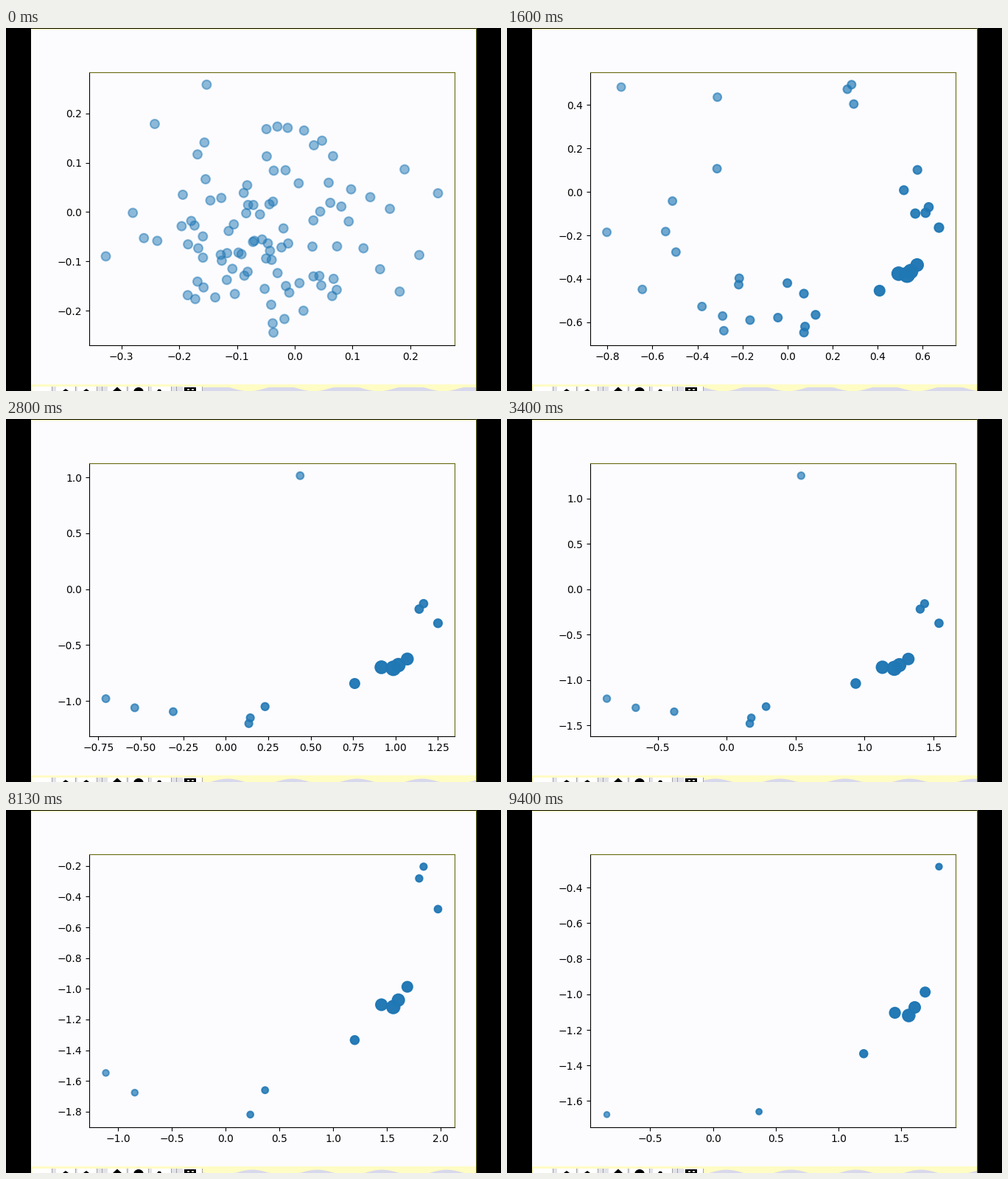
A matplotlib script for the animation above (9870 ms loop, 672x492 px).

```python
import numpy as np
import matplotlib.pyplot as plt
from matplotlib.animation import FuncAnimation
from matplotlib.patches import Circle, Polygon, Rectangle

W, H, DPI = 672, 492, 100
LEFT, RIGHT, TOP, BOTTOM = 113, 609, 60, 429.6
STEP, LOOP = 30, 9870
PAPER, OLIVE, LILAC = "#fcfcff", "#6a6a10", "#d8d8ec"
BLUE = (0x1F / 255, 0x77 / 255, 0xB4 / 255)

# Start time of each pose
STARTS = [0, 1000, 1600, 2200, 2800, 3400, 3930, 8130, 8730, 9400]

# Cluster centres at full growth, by the (first, last) pose they live in
CENTRES = {
    (1, 9): [(1.666, -0.261), (1.564, -0.914), (1.341, -1.022),
             (1.443, -1.036), (1.487, -0.994), (1.111, -1.235),
             (0.339, -1.537), (-0.783, -1.552)],
    (1, 8): [(1.828, -0.446)],
    (1, 7): [(1.704, -0.19), (0.212, -1.684), (-1.032, -1.433)],
    (1, 6): [(0.199, -1.759), (-0.452, -1.603)],
    (1, 3): [(0.722, 1.285), (0.8, 1.1), (-0.846, 1.186), (-2.18, -0.504),
             (-1.388, -0.114), (1.568, 0.276), (0.198, -1.272),
             (-0.589, -1.16), (-0.768, -1.736), (1.542, -0.27)],
    (4, 5): [(0.641, 1.485)],
}
HEART = (1.443, -1.036)

# Loose dots per pose: how many, and the corners of the box they fill
CORNERS = np.array([(-0.568, -0.445), (0.3975, 0.38)])
LOOSE = [
    (98, np.array([(-0.327, -0.244), (0.248, 0.258)])),
    (36, CORNERS),
    (10, 1.3 * CORNERS),
]


def fill(pts, corners):
    """Stretch points so that they span a box."""
    lo, hi = pts.min(0), pts.max(0)
    return corners[0] + (pts - lo) / (hi - lo) * (corners[1] - corners[0])


def pose(k):
    """Positions, radii, opacities and axis limits of pose k."""
    grow = min(1 + 0.158 * (k - 6), 1.08)
    xy = [(grow * x, grow * y) for (first, last), pts in CENTRES.items()
          if first <= k <= last for x, y in pts]
    xy = np.array(xy).reshape(-1, 2)
    if k < len(LOOSE):
        count, corners = LOOSE[k]
        xy = np.vstack([fill(cloud[:count], corners), xy])

    # Dots grow larger and denser towards the heart of the cluster
    dist = np.hypot(*(xy / grow - HEART).T)
    merged = min(k, 1)
    radius = 7 - 0.25 * k + merged * 4.5 * np.exp(-dist / 0.35)
    alpha = 1 - 0.5 ** (1 + merged * 5 * np.exp(-dist / 1.2))

    lo, hi = xy.min(0), xy.max(0)
    pad = 0.05 * (hi - lo)
    return xy, radius, alpha, np.array([lo - pad, hi + pad])


cloud = np.random.default_rng(5).normal(size=(98, 2))
POSES = [pose(k) for k in range(len(STARTS))]

fig = plt.figure(figsize=(W / DPI, H / DPI), dpi=DPI, facecolor="black")

# Window and the top edge of its toolbar
win = fig.add_axes([0, 0, 1, 1])
win.set(xlim=(0, W), ylim=(H, 0))
win.axis("off")


def box(x, y, w, h, color):
    win.add_patch(Rectangle((x, y), w, h, fc=color, lw=0))


def shape(pts, color="black"):
    return win.add_patch(Polygon(pts, fc=color, lw=0))


box(34, 1, 604, H, PAPER)
box(34, 1, 604, 1, "#ffffa0")
box(638, 0, 1, H, OLIVE)
box(34, 483, 604, 9, "#fffcc4")
wave = shape([(265, H), (638, H), (638, H)], LILAC)
box(36, 486, 229, 6, "#e2e2ea")
for x in (36, 68, 97, 138, 167, 198, 240):
    box(x, 486, 26, 6, "white")
    box(x + 26, 486, 1, 6, "#a0a0a0")
for x in (130, 231):
    box(x, 486, 1, 6, "#a0a0a0")
for x in (81, 109):
    shape([(x - 4, H), (x, 489), (x + 4, H)])
shape([(145, H), (151, 486.5), (157, H)])
win.add_patch(Circle((180, 494), 7, fc="black", lw=0))
shape([(205, H), (207, 489.5), (210, 490), (211, H)])
box(242, 487, 16, 5, "black")
for x in (246, 252):
    box(x, 489, 3, 1.5, "#c8c8c8")

ax = fig.add_axes([LEFT / W, 1 - BOTTOM / H, (RIGHT - LEFT) / W,
                   (BOTTOM - TOP) / H], facecolor=PAPER)
for side in ("top", "right"):
    ax.spines[side].set_color(OLIVE)
dots = ax.scatter([], [], linewidths=1.5)


def draw(i):
    k = sum(start < (i + 1) * STEP for start in STARTS) - 1
    xy, radius, alpha, limits = POSES[k]
    rgba = np.column_stack([np.tile(BLUE, (len(xy), 1)), alpha])
    dots.set_offsets(xy)
    dots.set_sizes(((radius - 0.75 * DPI / 72) * 144 / DPI) ** 2)
    dots.set_facecolor(rgba)
    dots.set_edgecolor(rgba)
    ax.set(xlim=limits[:, 0], ylim=limits[:, 1])

    x = np.linspace(265, 638, 120)
    rise = 4 * ((0.9 if k < 4 else 0.1) + np.sin(x / 14 + 1.3 * k))
    crest = np.column_stack([x, H - np.clip(rise, 0, 5)])
    wave.set_xy(np.vstack([(265, H), crest, (638, H)]))
    return dots, wave


anim = FuncAnimation(fig, draw, frames=LOOP // STEP, interval=STEP,
                     repeat=True, repeat_delay=0, cache_frame_data=False)
plt.show()
```
